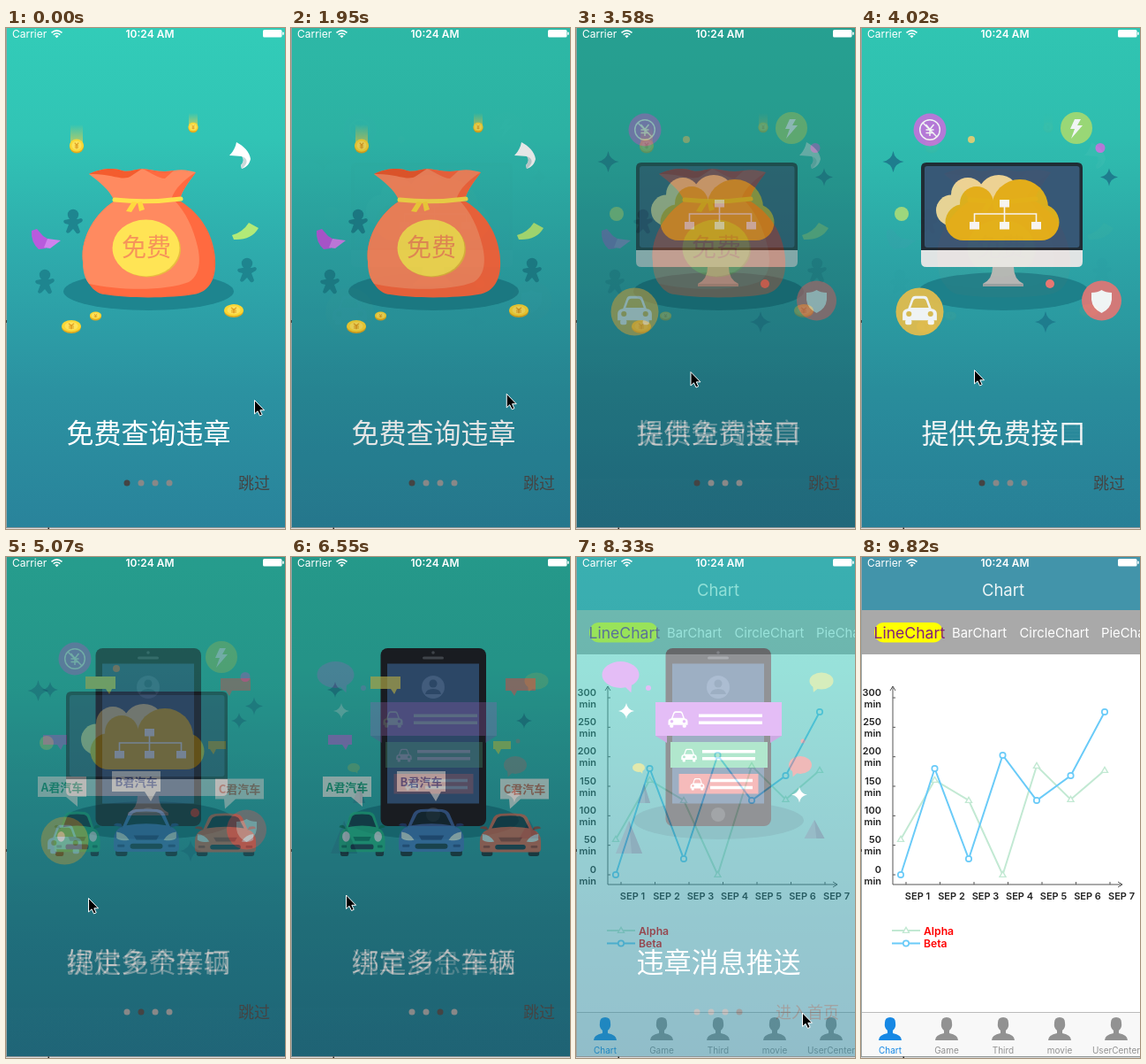
Recreate the animation shown at these times as an HTML page. Size 316 by 566 pixels, loop 9.86 s.

```html
<!DOCTYPE html>
<html lang="zh">
<head>
<meta charset="utf-8">
<title>Intro pages</title>
<style>
html, body { margin: 0; width: 100%; height: 100%; overflow: hidden; background: #000; }
svg { display: block; width: 316px; height: 566px; }
text { font-family: Inter, Roboto, sans-serif; }
.cjk { font-family: "Noto Sans CJK SC", "Noto Sans CJK", sans-serif; font-weight: 300; }
</style>
</head>
<body>
<svg id="stage" viewBox="0 0 316 566" xmlns="http://www.w3.org/2000/svg"></svg>
<script>
const LOOP = 9860, START = 1650, STEP = 148.3;
const TEAL = '#1e858f';

// Small shape helpers
const path = (d, fill, extra = '') => `<path d="${d}" fill="${fill}" ${extra}/>`;
const line = (d, color, w = 1, extra = '') => path(d, 'none', `stroke="${color}" stroke-width="${w}" ${extra}`);
const rect = (x, y, w, h, fill, r = 0) => `<rect x="${x}" y="${y}" width="${w}" height="${h}" rx="${r}" fill="${fill}"/>`;
const oval = (x, y, rx, ry, fill, extra = '') => `<ellipse cx="${x}" cy="${y}" rx="${rx}" ry="${ry}" fill="${fill}" ${extra}/>`;
const dot = (x, y, r, fill, extra = '') => oval(x, y, r, r, fill, extra);
const text = (x, y, size, fill, str, extra = '') => `<text x="${x}" y="${y}" font-size="${size}" fill="${fill}" ${extra}>${str}</text>`;
const cjk = (x, y, size, fill, str, extra = '') => text(x, y, size, fill, str, `class="cjk" ${extra}`);
const at = (x, y, s, body) => `<g transform="translate(${x} ${y}) scale(${s})">${body}</g>`;
const MID = 'text-anchor="middle"', END = 'text-anchor="end"';

const star = (x, y, r, fill) =>
  at(x, y, r, path('M0 -1Q.14 -.14 1 0Q.14 .14 0 1Q-.14 .14 -1 0Q-.14 -.14 0 -1Z', fill));

const coin = (x, y, rx, ry) =>
  oval(x, y + 1, rx, ry, '#e0aa20') + oval(x, y - .3, rx, ry - .4, '#fbd735') +
  oval(x, y - .3, rx * .68, ry * .65, '#fde25c') +
  `<g transform="translate(${x} ${y}) scale(${rx / 11} ${ry / 11})">` +
  line('M-3 -5L0 -1L3 -5M0 -1V5M-3 0H3M-3 3H3', '#dfa023', 1.6) + '</g>';

const trail = (x, y, w, h) => rect(x - w / 2, y - h, w, h, 'url(#trail)');

const figure = (x, y) => at(x, y, 1,
  dot(0, -7, 6.2, TEAL) +
  path('M-5 -2L-10 -1Q-12 1 -9 3L-5 4L-8 12Q-7 15 -4 13L0 9L4 14Q7 15 8 12L5 4L10 1Q12 -2 9 -3L5 -2Z', TEAL));

// White pictogram of a car, 40 units wide
const carIcon = (x, y, s) => at(x, y, s,
  path('M-13 -3L-9 -14Q-8 -17 -5 -17H5Q8 -17 9 -14L13 -3Q19 -2 19 3V10H-19V3Q-19 -2 -13 -3Z', '#fff') +
  path('M-10 -4L-7 -12Q-6 -14 -4 -14H4Q6 -14 7 -12L10 -4Z', 'currentColor') +
  dot(-12, 3, 3, 'currentColor') + dot(12, 3, 3, 'currentColor') +
  rect(-16, 9, 7, 6, '#fff', 2) + rect(9, 9, 7, 6, '#fff', 2));

const page = (body, title) =>
  rect(0, 0, 316, 566, 'url(#sea)') + oval(161.5, 297.5, 96.5, 21.5, TEAL) + body +
  cjk(161.5, 468.5, 31, '#fff', title, MID);

function bagPage() {
  const skin = '#ff8a60', deep = '#ff6a40';
  return page(
    figure(76, 218) + figure(44, 286) + figure(273, 273) +
    trail(80, 131, 14, 22) + coin(80, 133, 8, 7.5) +
    trail(212, 111, 10, 15) + coin(212, 112, 5.5, 5.3) +
    path('M122 196C97 212 84 242 87 264C88 284 98 300 112 301C140 306 190 305 212 301C232 298 238 281 237 262C236 238 224 212 198 196Z', deep) +
    path('M122 196C97 212 84 242 87 264C87 274 89 283 94 289C130 297 182 297 207 287C219 280 221 264 217 247C212 225 203 208 192 196Z', skin) +
    path('M94 165C106 159 119 158 128 160C137 164 145 160 154 159C165 160 177 164 190 161C200 159 208 161 215 163C209 172 199 183 197 194H122C117 183 106 174 94 165Z', skin) +
    path('M94 165C106 159 119 158 128 160C137 164 145 160 154 159L142 167C132 174 121 164 94 165Z', '#f45c2e') +
    path('M154 159C165 160 177 164 190 161L180 170C172 170 164 163 154 159Z', deep) +
    path('M215 163C209 172 199 183 197 194H187C191 181 202 171 215 163Z', deep) +
    line('M123 194Q160 198 198 193', '#ffe04c', 5, 'stroke-linecap="round"') +
    path('M143 196L136 207L142 208L149 197ZM149 197L151 207L157 205L154 196Z', '#ffd93f') +
    oval(160, 250, 38, 31.5, '#e9bd3f') + oval(158.5, 248.5, 38, 32, '#ffe455') +
    cjk(159, 258, 28, '#f6935a', '免费', MID) +
    path('M261 129C269 133 276 140 277 148C276 153 273 157 267 159L266 155C269 152 270 148 267 145L253 144C257 140 260 135 261 129Z', '#fff') +
    path('M267 145C274 147 275 153 267 159L266 155C269 152 270 148 267 145Z', '#c9d9da') +
    path('M256 234Q268 231 275 220L286 226Q278 240 258 239Z', '#b2ea78') +
    path('M29 229L35 227L42 235L47 238L45 249L37 250Q28 242 29 229Z', '#b85bdd') +
    path('M47 238L62 240L50 249L43 248Z', '#d082ee') +
    coin(74, 337, 11, 7) + coin(101.5, 325, 6.5, 4.5) + coin(258, 319, 11, 7),
    '免费查询违章');
}

const cloud = (puffs, fill) => puffs.map(p => dot(...p, fill)).join('');

function cloudPage() {
  const boxes = [[157, 194], [123, 219], [157, 219], [193, 219]];
  const pale = '#f5dc9a', gold = '#eab519';
  return page(
    path('M68 252V158Q68 152 74 152H245Q251 152 251 158V252Z', '#222a33') +
    rect(72, 156, 175.5, 92, '#3a5878', 3) +
    path('M68 251H251V264Q251 270 245 270H74Q68 270 68 264Z', '#efefef') +
    path('M149 270H173Q173 284 184 289V292H138V289Q149 284 149 270Z', '#b9bdbd') + rect(138, 289, 46, 3, '#9ba6a8') +
    cloud([[102.5, 206, 17.5], [121, 188, 19], [156, 190, 24]], pale) + rect(102, 190, 54, 33.5, pale) +
    cloud([[116, 219.5, 20.5], [131, 198, 19], [180, 203, 32], [204, 219.5, 20.5]], gold) + rect(116, 198, 88, 42, gold) +
    line('M162.5 199V223M128.5 223V210H198.5V223', '#fff', 1.6) +
    boxes.map(([x, y]) => rect(x, y, 11, 8.5, '#fff')).join('') +
    dot(78, 115, 18.5, '#bf7be0') + dot(78, 115, 11.3, 'none', 'stroke="#fff" stroke-width="1.5"') +
    line('M73.5 109L78 114.5L82.5 109M78 114.5V122M73.5 115H82.5M73.5 118.5H82.5M70 107L86 123', '#fff', 1.5) +
    dot(244, 113, 18, '#a3df78') + path('M242 103H249L245 110H251L238 125L242 114H237Z', '#fff') +
    dot(66.5, 320.5, 27, '#e5c252') + `<g color="#e5c252">${carIcon(66.5, 320, 1.02)}</g>` +
    dot(272.5, 308, 22.5, '#e17c7b') +
    path('M261 299Q268 299 272.5 296Q277 299 284 299V307Q283 317 272.5 322Q262 317 261 307Z', '#fff') +
    dot(125, 126, 4, '#e5d47a') + dot(271, 135.5, 5.5, '#bf7be0') +
    dot(46, 210, 8, '#a8e080') + dot(214, 289, 5, '#f07c78') +
    star(36.5, 151, 12, '#1f7f92') + star(281, 168.5, 10, '#1f7f92') + star(209, 332, 12, '#1f7f92'),
    '提供免费接口');
}

const phone = () =>
  rect(101.5, 103, 119.5, 201, '#22262c', 8) + rect(109, 120.5, 104, 158, '#3b5f88') +
  dot(161, 108, 1.8, '#555b63') + rect(149, 112.5, 24, 3, '#555b63', 1.5) +
  dot(161, 291, 8, '#454a50') +
  dot(161, 147, 13, '#587ba6') + dot(161, 143, 4.5, '#3b5f88') + path('M152 155Q153 149 161 149Q169 149 170 155Z', '#3b5f88');

const bubble = (x, y, w, h, tip, fill) =>
  path(`M${x} ${y}h${w}v${h}H${tip + 3}L${tip} ${y + h + 6}L${tip - 4} ${y + h}H${x}Z`, fill);

const label = (x, y, base, tip, str, fill) =>
  path(`M${x} ${y}h55v23H${base + 7}L${tip} ${y + 34}L${base - 6} ${y + 23}H${x}Z`, '#f2f2ee') +
  cjk(x + 27.5, y + 16.5, 13, fill, str, MID + ' style="font-weight:700"');

const slantLights = path('M5 25Q14 26 19 34Q9 36 5 32ZM71 25Q62 26 57 34Q67 36 71 32Z', '#e4eff0');
const roundLights = dot(13, 29, 6, '#e4eff0') + dot(63, 29, 6, '#e4eff0');

// Front view of a car, drawn in a 76 by 52 box
const car = (x, y, w, h, fill, dark, lights) =>
  `<g transform="translate(${x} ${y}) scale(${w / 76} ${h / 52})">` +
  rect(4, 38, 13, 14, '#1d2a34', 3) + rect(59, 38, 13, 14, '#1d2a34', 3) +
  path('M12 19L18 5Q20 1 26 0Q38 -1 50 0Q56 1 58 5L64 19Q74 23 74 34V43Q74 47 70 47H6Q2 47 2 43V34Q2 23 12 19Z', fill) +
  path('M16 18L22 6Q23 4 27 3Q38 2 49 3Q53 4 54 6L60 18Q38 14 16 18Z', '#173846') +
  path('M2 18Q3 14 10 16L12 20ZM74 18Q73 14 66 16L64 20Z', dark) + lights +
  path('M24 29H52L49 34H27Z', dark) + rect(20, 38, 36, 6, '#1d3a4c', 3) +
  rect(6, 39, 8, 3, dark, 1) + rect(62, 39, 8, 3, dark, 1) + '</g>';

function carsPage() {
  return page(
    phone() +
    bubble(90, 135, 34, 14, 117, '#e2d85c') + bubble(243, 137, 34, 14, 253, '#dd7770') +
    bubble(42, 201, 27, 11, 62, '#b078dc') + bubble(229, 208, 20, 9, 235, '#b5d45c') +
    star(50, 150, 9, '#1f7f92') + star(264, 185, 9, '#1f7f92') +
    car(53, 288, 55, 50, '#25c08b', '#0d7c61', roundLights) +
    car(120, 285, 78, 53, '#4a7fcb', '#2e4f92', slantLights) +
    car(212, 290, 73, 48, '#e86c54', '#a64239', slantLights) +
    label(36, 248, 74, 81, 'A君汽车', '#169a70') + label(120, 242, 163, 164, 'B君汽车', '#4e5fa8') +
    label(237, 250.5, 253, 248, 'C君汽车', '#d66650'),
    '绑定多个车辆');
}

const banner = (x, y, w, h, fill, iconX, s, x1, x2) =>
  rect(x, y, w, h, fill) + `<g color="${fill}">${carIcon(iconX, y + h / 2 + 1, s)}</g>` +
  line(`M${x1} ${y + h / 2 - 3.8}H${x2}M${x1} ${y + h / 2 + 4.2}H${x2}`, '#fff', 3.6);

const balloon = (x, y, rx, ry, dx, fill) =>
  oval(x, y, rx, ry, fill) +
  path(`M${x + dx * .2} ${y + ry * .8}L${x + dx * .7} ${y + ry * 1.35}L${x + dx * .75} ${y + ry * .5}Z`, fill);

const peak = (x, y, w, h) =>
  path(`M${x} ${y}l${w / 2} ${h}h${-w}Z`, '#2f7690') + path(`M${x} ${y}l${w / 2} ${h}h${-w * .4}Z`, '#1d5c7a');

function pushPage() {
  return page(
    peak(60, 298, 30, 37) + peak(77, 256, 14, 22) + peak(270, 297, 23, 21) + phone() +
    path('M90 202H103V210ZM233 202H220V210Z', '#9a55c6') +
    banner(90, 164, 143, 38, '#c97bee', 115.5, .58, 139, 211) +
    banner(107, 209, 110, 29, '#62d09c', 128, .46, 143, 203) +
    banner(116.5, 245, 90, 22.5, '#ee7676', 137.5, .42, 152, 200) +
    balloon(50.5, 133, 21, 15, 17, '#c97bee') + balloon(278, 140, 13.5, 9.5, -13, '#aedc78') +
    balloon(254, 235, 13, 10, -12, '#e07270') + balloon(71, 238, 7, 5, 6, '#c5d45a') +
    dot(82, 148, 3, '#c97bee') + dot(257, 208, 2.5, '#e07270') +
    star(57, 174, 9, '#fff') + star(253, 268.5, 9, '#fff'),
    '违章消息推送');
}

function series(values, color, mark) {
  const pts = values.map((v, i) => [45 + i * 38.5, v]);
  return line('M' + pts.map(p => p.join(' ')).join('L'), color, 2) + pts.map(p => mark(...p, color)).join('');
}
const ring = (x, y, c) => dot(x, y, 3.2, '#fff', `stroke="${c}" stroke-width="1.7"`);
const tri = (x, y, c) => path(`M${x} ${y - 3.6}l3.5 6h-7Z`, '#fff', `stroke="${c}" stroke-width="1.4"`);

function chartPage() {
  const mint = '#c2e9d3', sky = '#6acbf8', bold = 'font-weight="600"';
  let s = rect(0, 0, 316, 566, '#fff') + rect(0, 0, 316, 60, '#4294aa') + rect(0, 60, 316, 50, '#a9a9a9') +
    text(161, 44, 18.5, '#eef6f7', 'Chart', MID) +
    rect(15, 74, 78, 22.5, '#ff0', 11) + text(14.5, 91.5, 17.6, '#80207c', 'LineChart') +
    [[103, 'BarChart'], [179.5, 'CircleChart'], [272, 'PieChart']].map(([x, t]) => text(x, 90.5, 14.8, '#fff', t)).join('') +
    line('M36 370V146M33 151L36 146L39 151M36 370H296M291 367L296 370L291 373', '#555');
  for (let i = 0; i < 7; i++) {
    const y = 359 - i * 33.33;
    s += line(`M36 ${y}h3M${51 + i * 38.5} 370v-3`, '#555') +
      text(23, y - 2.3, 11, '#222', i * 50, `${END} ${bold}`) + text(23, y + 10.7, 11, '#222', 'min', `${END} ${bold}`) +
      text(64 + i * 38.5, 387, 11, '#222', 'SEP ' + (i + 1), `${MID} ${bold}`);
  }
  s += series([319, 252, 275, 359, 236, 274, 241], mint, tri) + series([359, 239, 341, 224, 275, 247, 175], sky, ring) +
    line('M35 422H67', mint, 2) + tri(51, 422, mint) + text(71, 427, 12.2, '#f00', 'Alpha', bold) +
    line('M35 436.5H67', sky, 2) + ring(51, 436.5, sky) + text(71, 441, 12.2, '#f00', 'Beta', bold) +
    rect(0, 514, 316, 52, '#f8f8f8') + rect(0, 514, 316, 1, '#bcbcbc');
  ['Chart', 'Game', 'Third', 'movie', 'UserCenter'].forEach((name, i) => {
    const x = 33 + i * 64, c = i ? '#929292' : '#1788e4';
    s += path(`M${x - 6} 526Q${x - 6} 520 ${x} 520Q${x + 6} 520 ${x + 6} 526Q${x + 7} 532 ${x + 3} 535V538Q${x + 13} 540 ${x + 13} 546H${x - 13}Q${x - 13} 540 ${x - 3} 538V535Q${x - 7} 532 ${x - 6} 526Z`, c) +
      text(x, 560.5, 10, c, name, MID);
  });
  return s;
}

const statusBar =
  text(7, 10.5, 12, '#fff', 'Carrier') + text(163, 10.5, 12, '#fff', '10:24 AM', MID + ' font-weight="600"') +
  line('M51.5 5.3Q57.5 .3 63.5 5.3M53.7 7.6Q57.5 4.4 61.3 7.6', '#fff', 1.6) +
  path('M55.3 9Q57.5 7.3 59.7 9L57.5 11.3Z', '#fff') +
  rect(291, 2, 21.5, 8.5, '#fff', 1.5) + rect(313.2, 4.5, 1.5, 3.5, '#fff', .7);

const frame = rect(0, 0, 1, 566, '#9aa3a3') + rect(0, 564, 316, 1, '#8f9696') +
  rect(0, 565, 316, 1, '#dcdcdc') + rect(47.5, 564.5, 1.5, 1.5, '#222') + rect(0, 330, 1, 3, '#444');

const stage = document.getElementById('stage');
stage.innerHTML = `<defs>
  <linearGradient id="sea" x2="0" y2="1">
    <stop stop-color="#32ccb8"/><stop offset=".22" stop-color="#31c4b5"/><stop offset=".45" stop-color="#2eabac"/>
    <stop offset=".72" stop-color="#2b92a1"/><stop offset="1" stop-color="#29839b"/>
  </linearGradient>
  <linearGradient id="trail" x2="0" y2="1">
    <stop stop-color="#e8d04a" stop-opacity="0"/><stop offset="1" stop-color="#e8d04a" stop-opacity=".75"/>
  </linearGradient></defs>` + rect(0, 0, 316, 566, '#000') +
  [pushPage, carsPage, cloudPage, bagPage].map((draw, i) => `<g id="page${3 - i}">${draw()}</g>`).join('') +
  `<g id="controls">${[0, 1, 2, 3].map(i => dot(137 + i * 16, 514, 3.5, '#888', 'class="dot"')).join('')}` +
  cjk(299, 520.5, 18, '#444', '跳过', END + ' id="skip"') + '</g>' +
  `<g id="chart">${chartPage()}</g>` + statusBar +
  `<g id="cursor">${path('M0 0V15.5L3.5 12.3L6 17.5L8.7 16.3L6.3 11.3H11Z', '#000', 'stroke="#fff" stroke-width="1"')}</g>` + frame;

const $ = id => document.getElementById(id);
const pages = [0, 1, 2, 3].map(i => $('page' + i));
const dots = [...stage.querySelectorAll('.dot')];

// Keys: time followed by values
const scrollKeys = [[1650, 0], [2836, .43], [3450, .62], [4023, .97], [4160, 1], [4460, 1], [5061, 1.64], [5355, 2],
  [6090, 2], [6544, 2.48], [6985, 3]];
const cursorKeys = [[1650, 281.5, 420.5], [2836, 132.5, 392], [4023, 128.5, 386.5], [4460, 283, 390], [5061, 93.5, 385.5],
  [5355, 90, 385], [5950, 90, 385], [6090, 215, 388], [6544, 62.5, 382], [6985, 68, 381], [7280, 70, 381],
  [8025, 256.5, 515], [8910, 256.5, 515], [9360, 235, 568]];
const fadeKeys = [[8176, 0], [8323, .5], [8470, 1]];

function sample(keys, t) {
  const i = keys.findIndex(k => k[0] > t);
  if (i === 0) return keys[0].slice(1);
  if (i < 0) return keys[keys.length - 1].slice(1);
  const a = keys[i - 1], b = keys[i], u = (t - a[0]) / (b[0] - a[0]);
  return a.slice(1).map((v, n) => v + (b[n + 1] - v) * u);
}

function show(el, alpha) {
  el.setAttribute('display', alpha > 0 ? 'inline' : 'none');
  el.setAttribute('opacity', alpha);
}

function render(time) {
  // The picture is refreshed in fixed steps
  const t = START + Math.floor((time - START + 8) / STEP) * STEP;
  const [pos] = sample(scrollKeys, t), [fade] = sample(fadeKeys, t), [x, y] = sample(cursorKeys, t);
  const front = Math.floor(pos), part = pos - front;
  pages.forEach((p, i) => show(p, i === front ? 1 - part : i === front + 1 ? part : 0));
  const current = [4160, 5350, 6980].filter(k => t >= k).length;
  dots.forEach((d, i) => d.setAttribute('fill', i === current ? '#444' : '#888'));
  $('skip').textContent = current === 3 ? '进入首页' : '跳过';
  $('skip').setAttribute('x', current === 3 ? 298 : 299);
  show($('chart'), fade);
  $('cursor').setAttribute('transform', `translate(${x} ${y})`);
}

const begin = performance.now();
function tick() {
  render((performance.now() - begin) % LOOP);
  requestAnimationFrame(tick);
}
tick();
</script>
</body>
</html>
```
